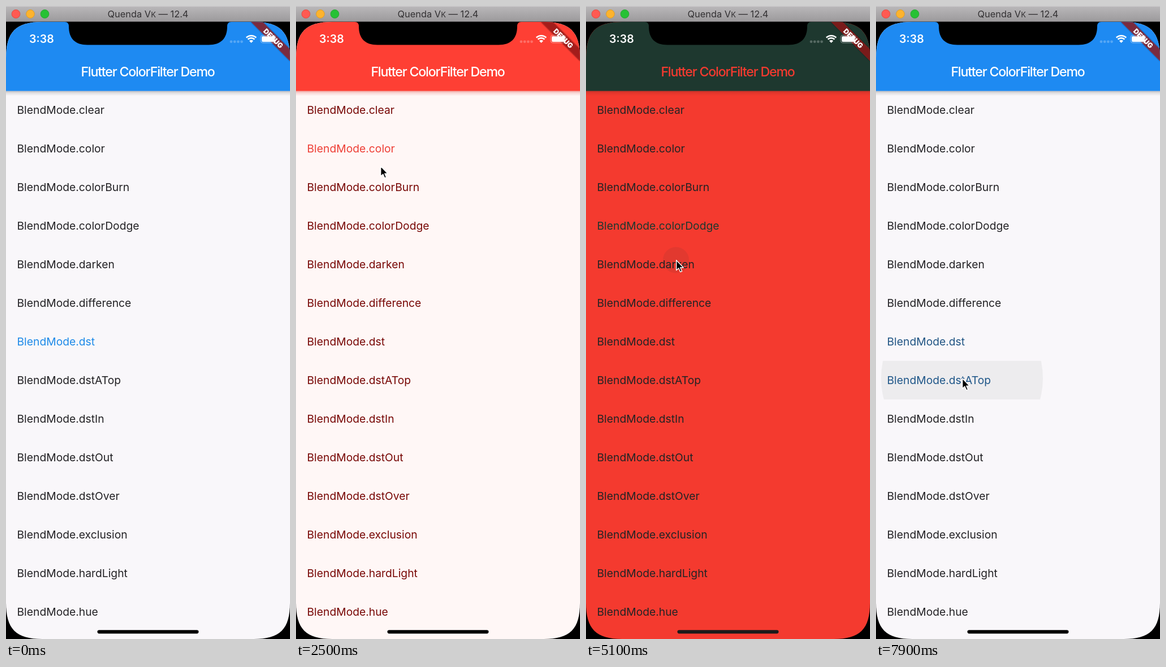
Write an HTML page that moves like this. It is 502 px wide and 1115 px high and loops after 8 s.

```html
<!DOCTYPE html>
<html lang="en">
<head>
<meta charset="utf-8">
<title>Flutter ColorFilter Demo</title>
<style>
html, body { margin: 0; width: 100%; height: 100%; overflow: hidden; background: #000; }
svg { display: block; width: 100vw; height: 100vh; }
text { font-family: Inter, Roboto, sans-serif; }
</style>
</head>
<body>
<svg viewBox="0 0 502 1115">
  <defs>
    <linearGradient id="chrome" x2="0" y2="1">
      <stop stop-color="#bab8ba"/><stop offset="1" stop-color="#9b999b"/>
    </linearGradient>
    <linearGradient id="fade" x2="0" y2="1">
      <stop class="shade" stop-opacity=".9"/>
      <stop class="shade" offset=".4" stop-opacity=".35"/>
      <stop class="shade" offset="1" stop-opacity="0"/>
    </linearGradient>
    <clipPath id="screen">
      <path d="M0 92C0 45.6 17.6 28 64 28H438C484.4 28 502 45.6 502 92V1051C502 1097.4 484.4 1115 438 1115H64C17.6 1115 0 1097.4 0 1051Z"/>
    </clipPath>
    <clipPath id="rowClip"><rect id="rowBox" width="502" height="68"/></clipPath>
    <filter id="soft" x="-20%" y="-20%" width="140%" height="140%"><feGaussianBlur stdDeviation="1"/></filter>
  </defs>
  <rect width="502" height="1115"/>
  <g clip-path="url(#screen)">
    <rect id="page" y="28" width="502" height="1087"/>
    <g clip-path="url(#rowClip)"><circle id="ripple"/></g>
    <g id="list" font-size="19.3"></g>
    <rect id="shadow" y="149.5" width="502" height="9" fill="url(#fade)"/>
    <rect id="bar" y="28" width="502" height="121.7"/>
    <text id="title" x="250.5" y="124" text-anchor="middle" font-size="23.2" font-weight="500" letter-spacing="-1.2">Flutter ColorFilter Demo</text>
    <path d="M433 28H454L502 76V97Z" opacity=".5" filter="url(#soft)"/>
    <path d="M433 28H454L502 76V97Z" fill="#b71c1c" fill-opacity=".627"/>
    <text transform="translate(472.5 57) rotate(45)" y="4.5" text-anchor="middle" font-size="12.4" font-weight="900" fill="#fff">DEBUG</text>
    <path d="M104 28Q111 28 111 36C111 57 122 68.5 144 68.5H358C380 68.5 391 57 391 36Q391 28 398 28Z"/>
    <rect id="home" x="161.5" y="1099.2" width="179" height="6.2" rx="3.1"/>
  </g>
  <g fill="#fff">
    <text x="41" y="65" font-size="19.6" font-weight="600">3:38</text>
    <g fill-opacity=".25">
      <circle cx="398" cy="62.8" r="2.4"/><circle cx="404.2" cy="62.8" r="2.4"/>
      <circle cx="410.4" cy="62.8" r="2.4"/><circle cx="416.6" cy="62.8" r="2.4"/>
    </g>
    <path d="M433.5 65L430 61.4A5 5 0 0 1 437 61.4Z"/>
    <path d="M427.6 58.8A8.4 8.4 0 0 1 439.4 58.8M424.8 55.8A12.4 12.4 0 0 1 442.2 55.8" fill="none" stroke="#fff" stroke-width="2.6"/>
    <rect x="450" y="51.5" width="27" height="13.5" rx="4" fill="none" stroke="#fff" stroke-opacity=".45"/>
    <rect x="452" y="53.3" width="23" height="10" rx="2.4"/>
    <path d="M479 56Q481.5 58.2 479 60.5Z" fill-opacity=".5"/>
  </g>
  <rect width="502" height="28" fill="url(#chrome)"/>
  <path d="M0 .5H502" stroke="#cfcdcf"/>
  <path d="M0 27.5H502" stroke="#5c5a5c"/>
  <g stroke-width=".8">
    <circle cx="17.5" cy="14" r="7.4" fill="#ff5a52" stroke="#dd4038"/>
    <circle cx="43" cy="14" r="7.4" fill="#fdb32d" stroke="#d99620"/>
    <circle cx="68.5" cy="14" r="7.4" fill="#27c135" stroke="#1ba228"/>
  </g>
  <text x="251" y="20" text-anchor="middle" font-size="16.4" fill="#333133">Quenda V<tspan font-size="13">K</tspan> — 12.4</text>
  <path id="cursor" d="M.7 1.2V19L4.8 15.2L7.8 22L10.6 20.8L7.8 14.2H13.2Z" stroke="#fff" stroke-width="1.4" stroke-linejoin="round"/>
</svg>
<script>
const LOOP = 8000, STEP = 100, ROW = 68, TOP = 149;
const modes = ['clear', 'color', 'colorBurn', 'colorDodge', 'darken', 'difference', 'dst',
  'dstATop', 'dstIn', 'dstOut', 'dstOver', 'exclusion', 'hardLight', 'hue'];

// bar, page, text, selected text, title, ripple, shadow, shadow opacity
const plain = ['#1e8af2', '#f9f7fa', '#232225', '#1e8ae8', '#ffffff', '#e3e4e5', '#000000', .28];
const looks = {
  clear: ['#000000', '#000000', '#000000', '#000000', '#000000', '#000000', '#000000', 0],
  color: ['#fe3f34', '#fff7f6', '#780806', '#ee3f36', '#ffffff', '#f8dedb', '#d01008', .4],
  colorBurn: ['#1500be', '#fae7e2', '#3a0000', '#2004ba', '#ffffff', '#e8b0a6', '#c01000', .85],
  colorDodge: ['#ffc6fb', '#ffffff', '#ff2b28', '#ffc6fb', '#ffffff', '#ffffff', '#ffffff', 0],
  darken: ['#1e382f', '#f43a2f', '#232425', '#1e382f', '#f43a2f', '#e2392f', '#301010', .25],
  difference: ['#cc47b4', '#08afbe', '#a51c1c', '#b4409c', '#08a8cc', '#109ba8', '#103038', .45]
};

// time, row
const taps = [[-1000, 6], [1350, 0], [2120, 1], [3150, 2], [4150, 3], [5085, 4], [5970, 5], [6880, 6], [7785, 7]];

// time, x, y of the pointer tip
const track = [[400, 300, 520], [1050, 148, 184], [1500, 147, 189], [1800, 147, 224], [2020, 148, 251],
  [2250, 148, 254], [2500, 149, 281], [2900, 152, 317], [3300, 154, 322], [3750, 156, 379], [4250, 157, 384],
  [4800, 159, 445], [5250, 159, 447], [5750, 165, 520], [6150, 165, 522], [6650, 159, 588], [7000, 158, 592],
  [7500, 152, 654], [8000, 152, 655]];

const $ = id => document.getElementById(id);
const set = (el, attrs) => { for (const k in attrs) el.setAttribute(k, attrs[k]); };
const clamp = v => Math.max(0, Math.min(1, v));
const last = (list, t) => list.reduce((found, item, i) => item[0] <= t ? i : found, 0);

function mix(a, b, p) {
  const part = (s, i) => parseInt(s.slice(i, i + 2), 16);
  return `rgb(${[1, 3, 5].map(i => Math.round(part(a, i) + (part(b, i) - part(a, i)) * p))})`;
}

function pointer(t) {
  const i = last(track, t), a = track[i], b = track[i + 1] || a;
  const u = clamp((t - a[0]) / (b[0] - a[0] || 1)), e = u * u * (3 - 2 * u);
  return [1, 2].map(k => a[k] + (b[k] - a[k]) * e);
}

const labels = modes.map((name, i) => {
  const el = document.createElementNS('http://www.w3.org/2000/svg', 'text');
  set(el, { x: 19.5, y: 190 + ROW * i });
  el.textContent = 'BlendMode.' + name;
  return $('list').appendChild(el);
});
const shades = document.querySelectorAll('.shade');

function draw(t) {
  const n = last(taps, t), [at, row] = taps[n], age = t - at;
  const before = n ? taps[n - 1][1] : row;
  const [bar, page, ink, picked, title, splash, shade, depth] = looks[modes[row]] || plain;

  set($('bar'), { fill: bar });
  set($('page'), { fill: page });
  set($('title'), { fill: title });
  set($('home'), { fill: modes[row] === 'clear' ? '#4a4648' : modes[row] === 'darken' ? '#1c1a1a' : '#000' });
  set($('shadow'), { opacity: depth });
  shades.forEach(s => set(s, { 'stop-color': shade }));

  const p = clamp((age - 25) / 175);
  labels.forEach((el, i) => {
    const on = i === row ? p : i === before ? 1 - p : 0;
    set(el, { fill: mix(ink, picked, on) });
  });

  const [cx, cy] = pointer(at);
  set($('rowBox'), { y: TOP + ROW * row });
  set($('ripple'), { cx, cy: cy + 1, r: 5 + 1.2 * Math.min(age, 400), fill: splash,
    opacity: clamp(1.15 - age / 190) });

  const [x, y] = pointer(t);
  set($('cursor'), { transform: `translate(${x} ${y})`, visibility: t < 400 ? 'hidden' : 'visible' });
}

const start = performance.now();
function tick() {
  const t = (performance.now() - start) % LOOP;
  draw(Math.floor(t / STEP) * STEP);
  requestAnimationFrame(tick);
}
tick();
</script>
</body>
</html>
```
